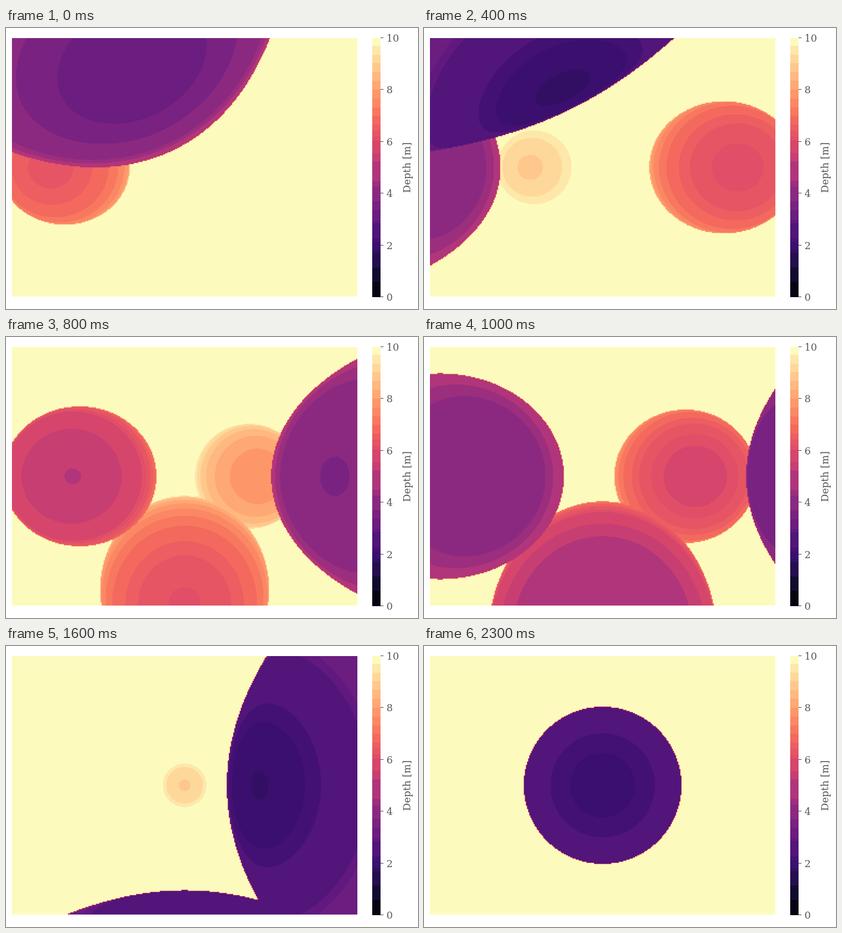
These frames come from a looping animation (693 by 474 pixels, 2400 ms). An HTML page with a canvas:

```html
<!DOCTYPE html>
<html lang="en">
<head>
<meta charset="utf-8">
<title>Depth camera flight</title>
<style>
  html, body { margin: 0; width: 100%; height: 100%; overflow: hidden; background: #fff; }
  canvas { display: block; }
</style>
</head>
<body>
<canvas id="stage" width="693" height="474"></canvas>
<script>
const STEP_MS = 100, STEPS = 24, MAX_DEPTH = 10;
const view = { x: 10, y: 17, w: 581, h: 436 };
const bar = { x: 616, y: 17, w: 14, h: 437 };
const COLS = 320, ROWS = 240;
const FOCAL = 375, CENTER_X = 300.5, CENTER_Y = 235;
const SPREAD = 10.9; // off-axis share of the measured depth

// x (right), y (down), z (ahead at the start), radius, in metres
const spheres = [
  [-2, -4, 5, 4],
  [-4.03, 0, 8, 2],
  [4, 0, 12, 2.28],
  [-3, 0, 15, 2.1],
  [0, 4, 17, 3.19],
  [2.72, 0, 18, 2.3],
  [0, 0, 26, 1]
];

const magma = ['000004', '140e36', '3b0f70', '641a80', '8c2981', 'b73779',
               'de4968', 'f7705c', 'fe9f6d', 'fecf92', 'fcfdbf']
  .map(hex => [0, 2, 4].map(i => parseInt(hex.slice(i, i + 2), 16)));

const limits = [0, .6, 1.14, 1.69, 1.84, 2.1, 2.27, 2.87, 2.98, 3.36, 3.71, 4.26, 4.48,
                5.24, 5.56, 6.04, 6.2, 6.44, 6.65, 7, 7.33, 7.67, 8.01, 8.35, 8.69,
                9.03, 9.37, 9.71, 10.2];

function magmaAt(depth) {
  const i = Math.min(9, Math.floor(depth)), f = depth - i;
  return magma[i].map((c, k) => Math.round(c + (magma[i + 1][k] - c) * f));
}

const bands = limits.slice(1).map((top, i) => magmaAt((limits[i] + top) / 2));

const shades = new Uint32Array(1001);
for (let i = 0, band = 0; i <= 1000; i++) {
  while (i / 100 >= limits[band + 1]) band++;
  const [r, g, b] = bands[band];
  shades[i] = (255 << 24 | b << 16 | g << 8 | r) >>> 0;
}

const ctx = document.getElementById('stage').getContext('2d');
const image = ctx.createImageData(view.w, view.h);
const pixels = new Uint32Array(image.data.buffer);
const depths = new Float32Array(COLS * ROWS);

// Neighbouring cells and smooth blend weight for each screen pixel of one axis
function sampler(size, cells) {
  return Array.from({ length: size }, (_, i) => {
    const u = Math.max(0, Math.min(cells - 1, (i + .5) * cells / size - .5));
    const low = Math.floor(u);
    return [low, Math.min(cells - 1, low + 1), .5 - .5 * Math.cos(Math.PI * (u - low))];
  });
}
const sampleX = sampler(view.w, COLS), sampleY = sampler(view.h, ROWS);

function castRays(travel) {
  const near = spheres.map(([x, y, z, r]) => {
    const ahead = z - travel;
    return [x, y, ahead, x * x + y * y + ahead * ahead - r * r];
  });
  for (let row = 0, n = 0; row < ROWS; row++) {
    const y = (view.y + (row + .5) * view.h / ROWS - CENTER_Y) / FOCAL;
    for (let col = 0; col < COLS; col++) {
      const x = (view.x + (col + .5) * view.w / COLS - CENTER_X) / FOCAL;
      const off = x * x + y * y, a = 1 + off;
      let z = Infinity;
      for (const [sx, sy, sz, c] of near) {
        const b = x * sx + y * sy + sz, disc = b * b - a * c;
        if (b > 0 && disc > 0) z = Math.min(z, (b - Math.sqrt(disc)) / a);
      }
      depths[n++] = Math.min(MAX_DEPTH, Math.sqrt(z * z + SPREAD * off));
    }
  }
}

function drawView(travel) {
  castRays(travel);
  let n = 0;
  for (const [r0, r1, fy] of sampleY) {
    const top = r0 * COLS, bottom = r1 * COLS;
    for (const [c0, c1, fx] of sampleX) {
      const upper = depths[top + c0] * (1 - fx) + depths[top + c1] * fx;
      const lower = depths[bottom + c0] * (1 - fx) + depths[bottom + c1] * fx;
      pixels[n++] = shades[Math.floor((upper * (1 - fy) + lower * fy) * 100 + 1e-3)];
    }
  }
  ctx.putImageData(image, view.x, view.y);
}

function drawScale() {
  const yAt = depth => bar.y + bar.h * (1 - Math.min(depth, MAX_DEPTH) / MAX_DEPTH);
  bands.forEach((rgb, i) => {
    const top = Math.round(yAt(limits[i + 1]));
    ctx.fillStyle = `rgb(${rgb})`;
    ctx.fillRect(bar.x, top, bar.w, Math.round(yAt(limits[i])) - top);
  });
  ctx.fillStyle = '#555';
  ctx.font = '16.67px "DejaVu Serif", "Noto Serif", serif';
  for (let depth = 0; depth <= MAX_DEPTH; depth += 2) {
    const y = yAt(depth);
    ctx.fillRect(bar.x + bar.w, Math.round(y) - 1, 5, 1);
    ctx.fillText(depth, 640, y + 6);
  }
  ctx.save();
  ctx.translate(679.5, 235.5);
  ctx.rotate(-Math.PI / 2);
  ctx.textAlign = 'center';
  ctx.fillText('Depth [m]', 0, 0);
  ctx.restore();
}

ctx.fillStyle = '#fff';
ctx.fillRect(0, 0, 693, 474);
drawScale();

let shown = -1;
const start = performance.now();
function tick() {
  const step = Math.floor((performance.now() - start) / STEP_MS) % STEPS;
  if (step !== shown) drawView(shown = step);
  requestAnimationFrame(tick);
}
tick();
</script>
</body>
</html>
```
